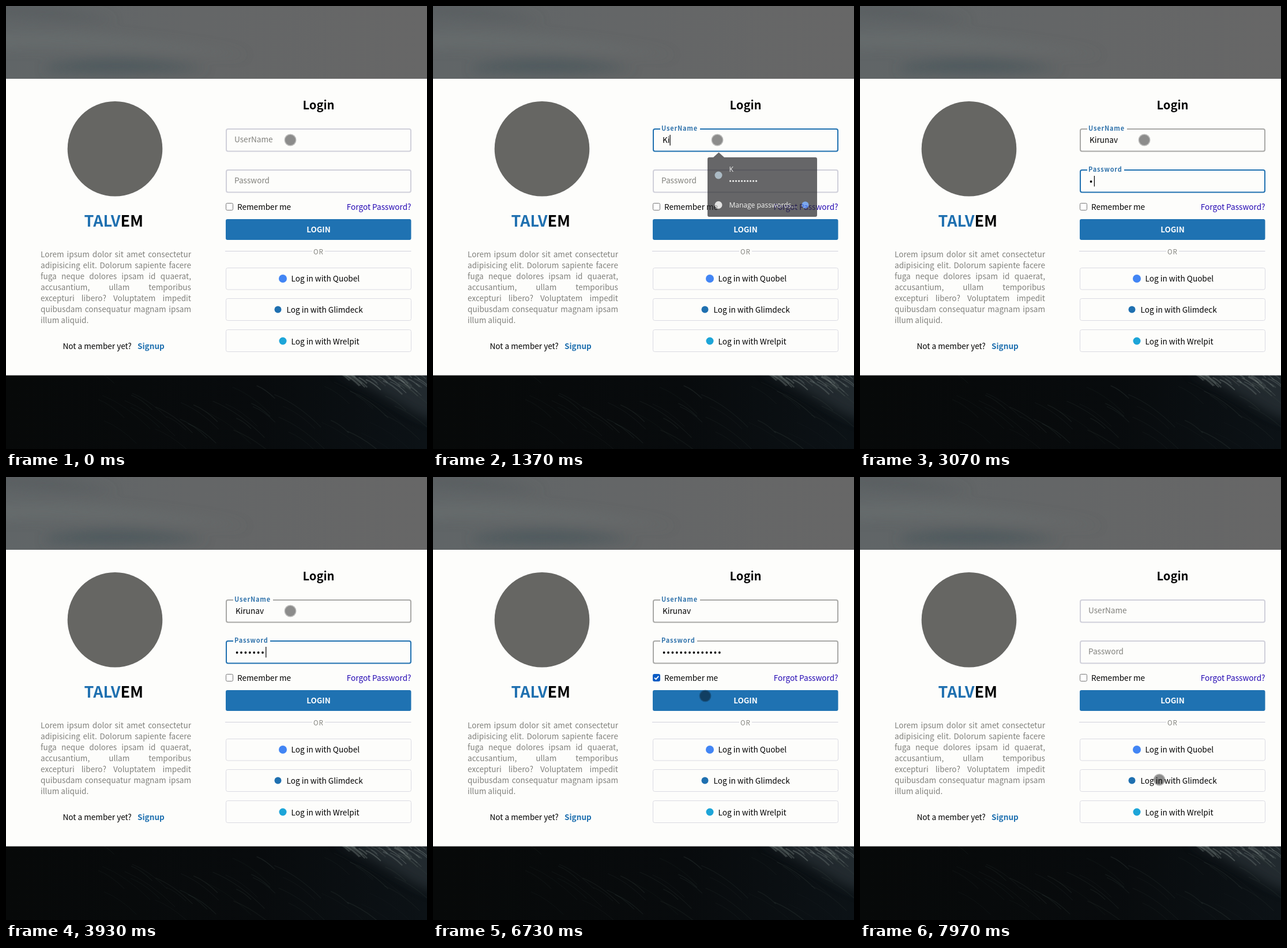
These frames come from a looping animation (730 by 767 pixels, 8000 ms). An HTML page:

```html
<!DOCTYPE html>
<html lang="en">
<head>
<meta charset="utf-8">
<title>Login form</title>
<style>
html, body { margin: 0; width: 100%; height: 100%; overflow: hidden; background: #080a0b; }
svg, .intro { position: absolute; left: 0; top: 0; }
svg, .intro { font: 13.6px "Noto Sans CJK SC", "Noto Sans CJK JP", "Noto Sans CJK", "Noto Sans", sans-serif; }
.intro { left: 60px; top: 420px; width: 261px; line-height: 19px; color: #80807c; }
.intro div { height: 19px; white-space: nowrap; text-align-last: justify; }
.intro div:last-child { text-align-last: left; }
.bold { font-weight: 700; }
.accent { fill: #1f70b0; }
.mid { text-anchor: middle; }
.box { fill: none; stroke: #dadae2; }
</style>
</head>
<body>
<svg width="730" height="767" viewBox="0 0 730 767">
  <defs>
    <linearGradient id="sky">
      <stop offset="0" stop-color="#606567"/>
      <stop offset=".45" stop-color="#646667"/>
      <stop offset="1" stop-color="#676767"/>
    </linearGradient>
    <linearGradient id="ground">
      <stop offset="0" stop-color="#070909"/>
      <stop offset=".6" stop-color="#080b0d"/>
      <stop offset="1" stop-color="#0c1216"/>
    </linearGradient>
    <filter id="soft" x="-30%" y="-100%" width="160%" height="300%"><feGaussianBlur stdDeviation="10"/></filter>
    <clipPath id="skyClip"><path d="M0 0H730V126H0z"/></clipPath>
    <clipPath id="groundClip"><path d="M0 639H730V767H0z"/></clipPath>
  </defs>

  <g clip-path="url(#skyClip)">
    <rect width="730" height="126" fill="url(#sky)"/>
    <g filter="url(#soft)">
      <path d="M70 104Q190 78 350 108Q220 122 70 112z" fill="#48545a" opacity=".7"/>
      <path d="M-30 -6Q90 -8 190 26Q80 26-30 14z" fill="#565c5e" opacity=".6"/>
      <path d="M-30 48Q160 38 420 86Q180 66-30 74z" fill="#6c7070" opacity=".6"/>
    </g>
  </g>
  <g clip-path="url(#groundClip)">
    <rect y="639" width="730" height="128" fill="url(#ground)"/>
    <path d="M570 630Q640 664 690 694T760 716V630z" fill="#303a40" opacity=".6" filter="url(#soft)"/>
    <g id="streaks" fill="none"></g>
  </g>
  <rect y="126" width="730" height="513.5" fill="#fdfdfb"/>

  <circle cx="189" cy="247.3" r="82.3" fill="#666663"/>
  <text class="bold" x="135.5" y="382" font-size="27"><tspan class="accent">TALV</tspan><tspan>EM</tspan></text>
  <text x="98.5" y="594">Not a member yet?</text>
  <text class="bold accent" x="228" y="594">Signup</text>

  <text class="bold mid" x="542" y="179" font-size="20.2">Login</text>
  <g id="fields"></g>

  <rect id="check" x="381.5" y="341.5" width="12" height="12" rx="2" fill="#fff" stroke="#767676"/>
  <path id="tick" d="M384 347.6l2.6 2.6 4.6-5.4" fill="none" stroke="#fff" stroke-width="1.9"/>
  <text x="401" y="353">Remember me</text>
  <text x="702.5" y="353" text-anchor="end" fill="#2307b3">Forgot Password?</text>
  <rect x="381" y="369" width="321.5" height="36" rx="3" fill="#1f72b2"/>
  <text class="bold mid" x="542" y="392" font-size="13.4" fill="#fff">LOGIN</text>
  <path d="M380 424.5H531M553 424.5H702.5" stroke="#d0d0dc"/>
  <text x="533" y="430" font-size="11.5" letter-spacing="1" fill="#80807c">OR</text>

  <rect class="box" x="381.5" y="453.5" width="321" height="37.5" rx="3"/>
  <circle cx="480" cy="472" r="7" fill="#4285f4"/>
  <text x="494.5" y="477">Log in with Quobel</text>
  <rect class="box" x="381.5" y="506.5" width="321" height="38" rx="3"/>
  <circle cx="471.5" cy="525.5" r="6" fill="#1f70b0"/>
  <text x="486.5" y="531">Log in with Glimdeck</text>
  <rect class="box" x="381.5" y="560.5" width="321" height="38" rx="3"/>
  <circle cx="480" cy="580" r="6.5" fill="#1da5d8"/>
  <text x="494.5" y="585.5">Log in with Wrelpit</text>

  <g id="popup" font-family="'Open Sans', sans-serif" font-size="12" fill="#f0f0ee">
    <path d="M479 262H486L495.5 253.5 505 262H663Q666 262 666 265V362Q666 365 663 365H479Q476 365 476 362V265Q476 262 479 262z" fill="#292a2d"/>
    <circle cx="495" cy="293" r="6.5" fill="#8aa0ae"/>
    <text x="513.5" y="287">K</text>
    <path d="M515.5 303H562" stroke="#f0f0ee" stroke-width="3.2" stroke-linecap="round" stroke-dasharray="0 5"/>
    <circle cx="495" cy="344.5" r="6.5" fill="#d8d8d8"/>
    <text x="513.5" y="349">Manage passwords...</text>
    <circle cx="645.5" cy="344.5" r="6" fill="#4a86e8"/>
  </g>

  <g id="pointer">
    <circle r="10.5" fill="#000" fill-opacity=".25"/>
    <circle r="9" fill="#000" fill-opacity=".26"/>
  </g>
</svg>
<div class="intro">
  <div>Lorem ipsum dolor sit amet consectetur</div>
  <div>adipisicing elit. Dolorum sapiente facere</div>
  <div>fuga neque dolores ipsam id quaerat,</div>
  <div>accusantium, ullam temporibus</div>
  <div>excepturi libero? Voluptatem impedit</div>
  <div>quibusdam consequatur magnam ipsam</div>
  <div>illum aliquid.</div>
</div>
<script>
const LOOP = 8000, RESET = 7250, CHECKED = 6150;
const NAME = 'Kirunav';
const NAME_KEYS = [1080, 1350, 1500, 1650, 1800, 1950, 2100];
const PASS_KEYS = Array.from({ length: 14 }, (_, i) => 3000 + 150 * i);
// time, x, y
const PATH = [
  [0, 493, 232], [5350, 493, 232], [5600, 480, 226], [6020, 388, 348],
  [6300, 388, 348], [6730, 472, 379], [7000, 482, 386], [7600, 482, 386],
  [7970, 519, 524], [8000, 520, 528]
];
const $ = id => document.getElementById(id);
const clamp = v => Math.min(1, Math.max(0, v));
const ease = v => v * v * (3 - 2 * v);
const mix = (a, b, p) => a + (b - a) * p;
const set = (el, attrs) => { for (const k in attrs) el.setAttribute(k, attrs[k]); };

function make(tag, attrs, parent) {
  const el = document.createElementNS('http://www.w3.org/2000/svg', tag);
  set(el, attrs);
  return parent.appendChild(el);
}

function drawStreaks() {
  let seed = 11;
  const rnd = () => (seed = seed * 16807 % 2147483647) / 2147483647;
  const streak = (x, y, len, stroke, opacity, width) => make('path', {
    d: `M${x} ${y}q${len * .5} ${len * .2} ${len} ${len * .7}`,
    stroke, opacity, 'stroke-width': width
  }, $('streaks'));
  for (let i = 0; i < 45; i++)
    streak(160 + rnd() * 540, 632 + rnd() * 110, 25 + rnd() * 65, '#36423f', .1 + rnd() * .2, .7 + rnd());
  for (let i = 0; i < 40; i++) {
    const x = 575 + rnd() * 150;
    streak(x, 634 + rnd() * (x - 560) * .2, 8 + rnd() * 26, '#7f8a88', .12 + rnd() * .3, .8 + rnd() * 1.6);
  }
}

function makeField(top, label, focus, blur, keys) {
  const g = $('fields');
  return {
    top, focus, blur, keys,
    frame: make('rect', { x: 382, y: top + 1, width: 320, height: 38.5, rx: 3, fill: 'none', 'stroke-width': 2 }, g),
    gap: make('rect', { x: 394, y: top - 2, width: label === 'UserName' ? 69 : 64, height: 6, fill: '#fdfdfb' }, g),
    label: Object.assign(make('text', { x: 396 }, g), { textContent: label }),
    caret: make('rect', { y: top + 11, width: 1.2, height: 18.5 }, g)
  };
}

drawStreaks();
const user = makeField(212, 'UserName', 430, 2650, NAME_KEYS);
const pass = makeField(283, 'Password', 2650, CHECKED, PASS_KEYS);
const nameText = make('text', { x: 398, y: 237 }, $('fields'));
const dots = make('g', {}, $('fields'));
PASS_KEYS.forEach((_, i) => make('circle', { cx: 400.6 + 7.4 * i, cy: 304, r: 1.9 }, dots));

function drawField(f, t, textEnd) {
  const live = t < RESET;
  const focused = t >= f.focus && t < f.blur;
  const p = live ? ease(clamp((t - f.focus) / 200)) : 0;
  const typed = live ? f.keys.filter(k => k <= t).length : 0;
  const lastKey = typed ? f.keys[typed - 1] : f.focus;
  set(f.frame, { stroke: focused ? '#1f70b0' : typed ? '#a8a8a6' : '#d0d0da' });
  set(f.gap, { opacity: p > .5 ? 1 : 0 });
  set(f.label, {
    y: f.top + mix(24, 4.2, p),
    'font-size': mix(13.6, 11, p),
    'letter-spacing': .8 * p,
    'font-weight': p > 0 ? 700 : 400,
    fill: `rgb(${mix(128, 50, p)},${mix(128, 116, p)},${mix(124, 172, p)})`
  });
  set(f.caret, {
    x: textEnd(typed),
    visibility: focused && (t - lastKey) % 1000 < 500 ? 'visible' : 'hidden'
  });
  return typed;
}

function nameEnd(count) {
  nameText.textContent = NAME.slice(0, count);
  return 398 + (count ? nameText.getComputedTextLength() : 0);
}

function render(t) {
  drawField(user, t, nameEnd);
  const typed = drawField(pass, t, n => n ? 398.4 + 7.4 * n : 398);
  [...dots.children].forEach((d, i) => set(d, { visibility: i < typed ? 'visible' : 'hidden' }));

  const on = t >= CHECKED && t < RESET;
  set($('check'), { fill: on ? '#0b5cc4' : '#fff', stroke: on ? '#0b5cc4' : '#767676' });
  set($('tick'), { visibility: on ? 'visible' : 'hidden' });
  set($('popup'), { opacity: clamp((t - 520) / 100) * clamp((1440 - t) / 97) });

  const i = Math.max(1, PATH.findIndex(k => k[0] > t));
  const [a, b] = [PATH[i - 1], PATH[i]];
  const p = (t - a[0]) / (b[0] - a[0]);
  set($('pointer'), { transform: `translate(${mix(a[1], b[1], p)} ${mix(a[2], b[2], p)})` });
}

const start = performance.now();
function tick() {
  render((performance.now() - start) % LOOP);
  requestAnimationFrame(tick);
}
tick();
</script>
</body>
</html>
```
